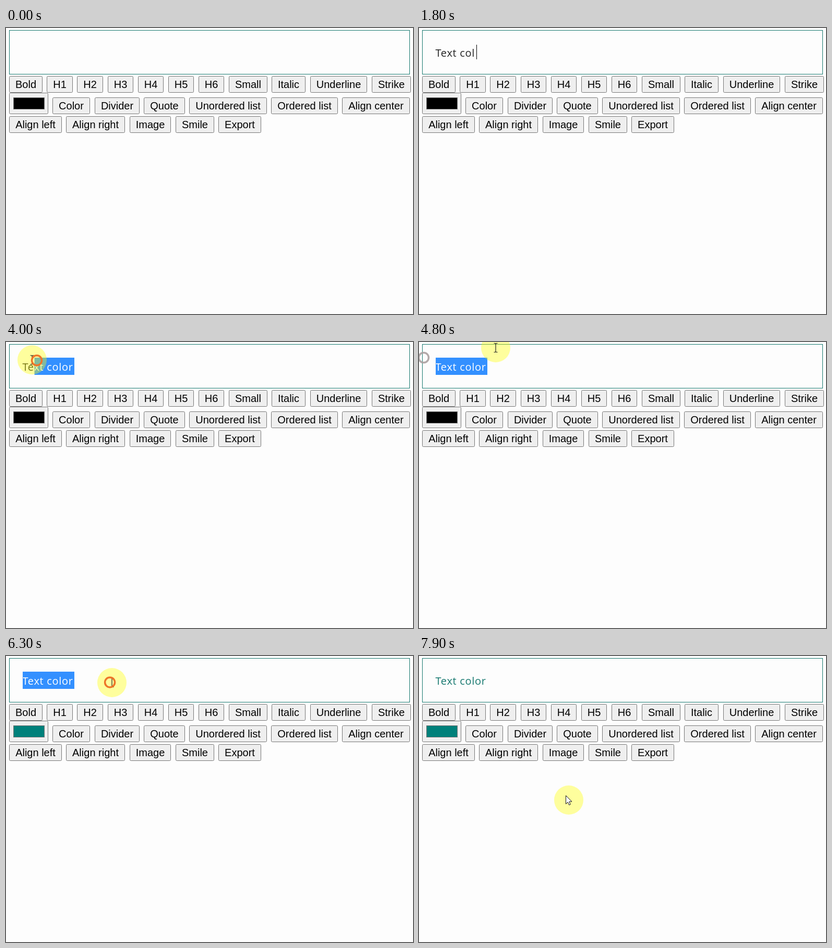
These frames come from a looping animation (780 by 548 pixels, 8000 ms). An HTML page:

```html
<!DOCTYPE html>
<html lang="en">
<head>
<meta charset="utf-8">
<title>Text color</title>
<style>
  html, body { margin: 0; width: 100%; height: 100%; overflow: hidden; background: #fdfdfd; }
  svg { display: block; width: 780px; height: 548px; }
  .button rect { fill: #efefef; stroke: #767676; }
  .button.hover rect { fill: #e5e5e5; stroke: #333; }
  .button text { font: 20px "Liberation Sans", Arial, sans-serif; text-anchor: middle; fill: #000; }
  .typed { font: 20px "Open Sans", "Noto Sans", sans-serif; letter-spacing: .7px; white-space: pre; }
</style>
</head>
<body>
<svg viewBox="0 0 780 548">
  <defs><clipPath id="selected"><rect id="clip" y="30" height="33"/></clipPath></defs>
  <rect width="780" height="548" fill="#fdfdfd"/>
  <rect x="6.5" y="4.5" width="767" height="84" fill="#fdfdfd" stroke="#16786f"/>
  <text id="text" class="typed" x="31.5" y="55"></text>
  <rect id="highlight" y="30" height="33" fill="#3390ff"/>
  <text class="typed" x="31.5" y="55" fill="#fff" clip-path="url(#selected)">Text color</text>
  <rect id="caret" y="32" width="1" height="28" fill="#000"/>
  <g id="buttons"></g>
  <rect id="swatch" x="14.5" y="133.5" width="59" height="22" stroke="#767676"/>
  <g id="pointer">
    <circle r="28" fill="#ff0" fill-opacity=".38"/>
    <path id="beam" d="M-3.5-8.5H-1L0-7.5 1-8.5H3.5M0-7.5V7.5M-3.5 8.5H-1L0 7.5 1 8.5H3.5"
      fill="none" stroke="#222" stroke-width="1.2"/>
    <path id="arrow" d="M-5.5-8.5V7.5L-1.8 4 .6 9.5 3.2 8.4.9 3H6Z" fill="#fff" stroke="#111"/>
  </g>
  <circle id="ring" r="9.5" fill="none" stroke-width="3.5"/>
</svg>
<script>
const LOOP = 8000, PHRASE = 'Text color', LEFT = 32, RIGHT = 131;
const $ = id => document.getElementById(id);
const set = (el, attrs) => { for (const k in attrs) el.setAttribute(k, attrs[k]); };
const show = (el, on) => el.setAttribute('visibility', on ? 'visible' : 'hidden');

// Each row: top, then label, left, right.
const rows = [
  [92, 'Bold', 6, 70, 'H1', 78, 128, 'H2', 136, 186, 'H3', 195, 244, 'H4', 253, 302,
    'H5', 311, 360, 'H6', 369, 418, 'Small', 427, 501, 'Italic', 509, 574,
    'Underline', 583, 692, 'Strike', 701, 776],
  [133, 'Color', 89, 161, 'Divider', 170, 256, 'Quote', 264, 343,
    'Unordered list', 351, 500, 'Ordered list', 508, 636, 'Align center', 644, 774],
  [169, 'Align left', 6, 107, 'Align right', 115, 228, 'Image', 237, 316,
    'Smile', 325, 399, 'Export', 407, 489]
];
const buttons = [];

function node(tag, attrs, parent) {
  const el = document.createElementNS('http://www.w3.org/2000/svg', tag);
  set(el, attrs);
  return parent.appendChild(el);
}

function addButton(label, x, y, right, bottom) {
  const el = node('g', { class: 'button' }, $('buttons'));
  node('rect', { x: x + .5, y: y + .5, width: right - x - 1, height: bottom - y - 1, rx: 2 }, el);
  node('text', { x: (x + right) / 2, y: y + 23 }, el).textContent = label;
  buttons.push({ el, x, y, right, bottom });
}

for (const [top, ...cells] of rows)
  for (let i = 0; i < cells.length; i += 3)
    addButton(cells[i], cells[i + 1], top, cells[i + 2], top + 32);
addButton('', 6, 124, 81, 165);

const keys = [400, 600, 800, 1000, 1200, 1400, 1600, 1750, 1950, 2100];
const stops = [32, 43, 54.5, 65, 72.5, 78.5, 88.5, 101, 110, 122, 131];

// Pointer path: time, x, y.
const path = [
  [3300, 215, 0], [3400, 195, 39], [3600, 150, 45], [3700, 140, 44], [4100, 20, 31],
  [4400, 9, 30], [4600, 9, 30], [4800, 147, 11], [5000, 138, 80], [5300, 116.5, 155.5],
  [5500, 45, 148], [5600, 45, 148], [5800, 122, 150], [5900, 128, 145], [6100, 178, 52],
  [6200, 190, 49], [6300, 203, 51], [6800, 203, 54], [7300, 203, 54],
  [7600, 250, 196], [7900, 287, 276]
];
const clicks = [[3650, 4560], [5490, 5560], [5770, 5860], [6250, 6380]];

function pointerAt(t) {
  let i = 1;
  while (i < path.length - 1 && t > path[i][0]) i++;
  const [t0, x0, y0] = path[i - 1], [t1, x1, y1] = path[i];
  const k = Math.min(1, Math.max(0, (t - t0) / (t1 - t0)));
  return [x0 + (x1 - x0) * k, y0 + (y1 - y0) * k];
}

function snap(t) {
  const step = Math.floor(t / 100);
  return (step % 5 === 2 ? step - 1 : step) * 100;
}

function drawText(t, x) {
  const count = keys.filter(k => k <= t).length;
  const selecting = t >= 3700 && t < 6400;
  let from = RIGHT;
  if (selecting) from = t >= 4100 ? LEFT
    : stops.reduce((a, b) => Math.abs(b - x) < Math.abs(a - x) ? b : a);
  $('text').textContent = PHRASE.slice(0, count);
  set($('text'), { fill: t >= 6400 ? '#16786f' : '#222' });
  for (const id of ['highlight', 'clip']) set($(id), { x: from, width: RIGHT - from });

  const since = t >= 6400 ? t - 6300 : t - 2100;
  const lit = since < 0 || since % 1060 < 530;
  set($('caret'), { x: count ? Math.round(stops[count]) - (count === 8 ? 0 : .2) : LEFT });
  show($('caret'), t >= 300 && !selecting && lit);
}

function drawRing(t) {
  const click = clicks.filter(c => c[0] <= t).pop();
  const age = click ? t - click[1] : 999;
  show($('ring'), age < 320);
  if (age >= 320) return;
  const [cx, cy] = pointerAt(age < 0 ? t - 30 : click[1]);
  set($('ring'), {
    cx, cy,
    stroke: age < 0 ? '#ee7528' : '#a99e9e',
    opacity: age < 0 ? 1 : Math.min(1, (320 - age) / 90)
  });
}

function draw(t) {
  const [x, y] = pointerAt(t), visible = t >= 3300;
  drawText(t, x);
  drawRing(t);
  set($('swatch'), { fill: t >= 5600 ? '#00807a' : '#000' });

  const inEditor = y < 90;
  set($('pointer'), { transform: `translate(${x} ${y})` });
  show($('pointer'), visible);
  show($('beam'), visible && inEditor);
  show($('arrow'), visible && !inEditor);
  const tipX = x - 5.5, tipY = y - 8.5;
  for (const b of buttons) b.el.classList.toggle('hover', visible && !inEditor &&
    tipX >= b.x && tipX < b.right && tipY >= b.y && tipY < b.bottom);
}

let start;
function tick(now) {
  start ??= now;
  draw(snap((now - start) % LOOP));
  requestAnimationFrame(tick);
}
draw(0);
requestAnimationFrame(tick);
</script>
</body>
</html>
```
